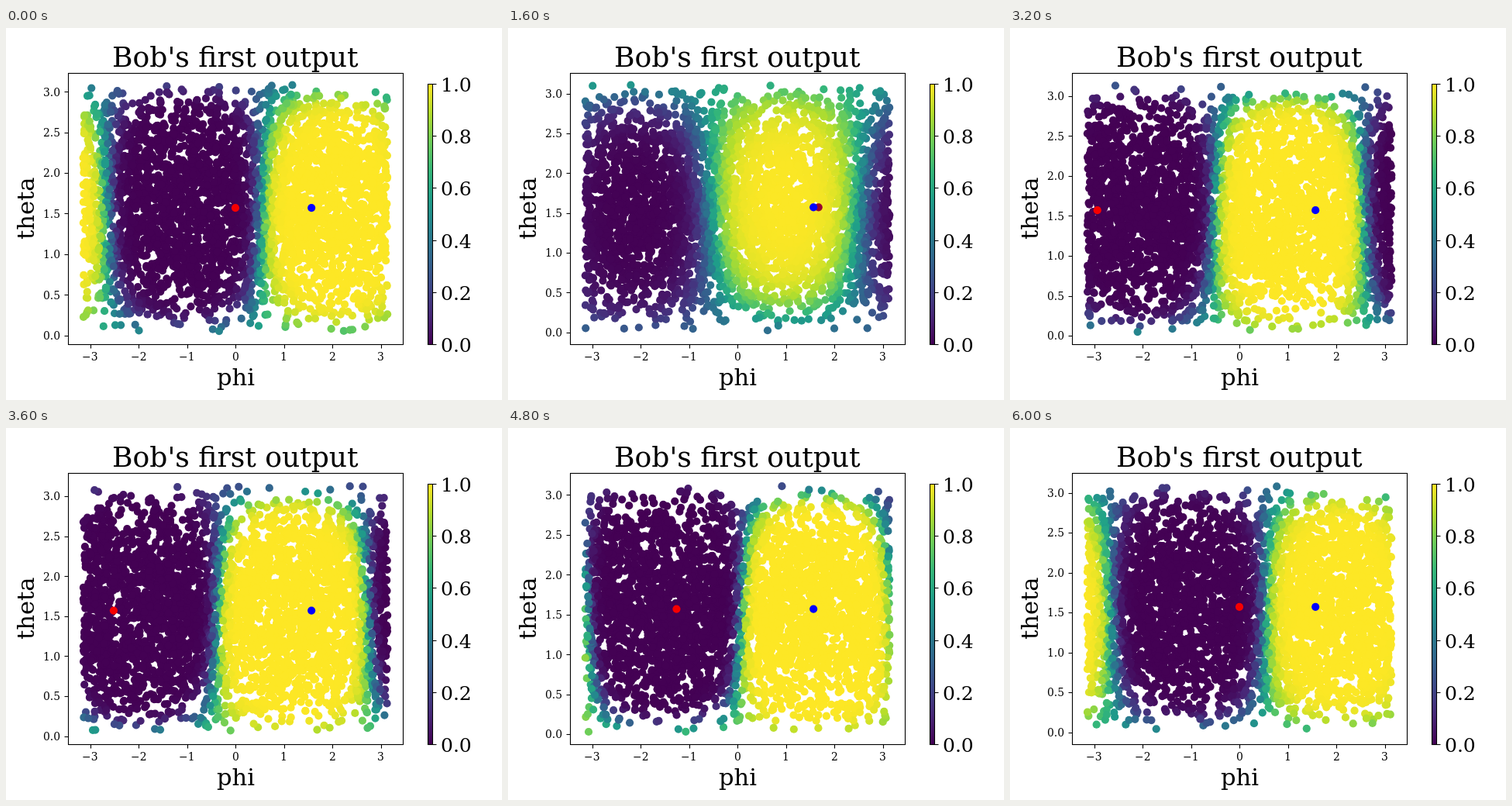
Animation of 640x480 px, one loop 6200 ms. Source, as an HTML page with a canvas:

```html
<!DOCTYPE html>
<html lang="en">
<head>
<meta charset="utf-8">
<title>Bob's first output</title>
<style>
html, body { margin: 0; width: 100%; height: 100%; overflow: hidden; background: #fff; }
canvas { display: block; }
</style>
</head>
<body>
<canvas id="stage" width="640" height="480"></canvas>
<script>
const ctx = document.getElementById('stage').getContext('2d');
const { PI, sin, cos, round, floor } = Math;
const STEP = 200, STEPS = 31, POINTS = 3800, RADIUS = 5.1;
const LEFT = 80.5, RIGHT = 512.5, TOP = 58.5, BOTTOM = 408.5;

const viridis = ['440154', '482878', '3e4989', '31688e', '26828e',
  '1f9e89', '35b779', '6ece58', 'b5de2b', 'fde725']
  .map(h => [0, 2, 4].map(i => parseInt(h.slice(i, i + 2), 16)));

function random(seed) {
  return () => {
    seed = (seed + 0x6d2b79f5) | 0;
    let t = Math.imul(seed ^ (seed >>> 15), 1 | seed);
    t = (t + Math.imul(t ^ (t >>> 7), 61 | t)) ^ t;
    return ((t ^ (t >>> 14)) >>> 0) / 4294967296;
  };
}

function color(p) {
  const v = p * 9, i = Math.min(8, floor(v));
  return `rgb(${viridis[i].map((c, j) => round(c + (viridis[i + 1][j] - c) * (v - i)))})`;
}

const wrap = a => a - 2 * PI * floor((a + PI) / (2 * PI));
const snap = v => round(v) + 0.5;
const px = phi => 296 + 62.5 * phi;

function dot(x, y, fill) {
  ctx.fillStyle = fill;
  ctx.beginPath();
  ctx.arc(x, y, RADIUS, 0, 2 * PI);
  ctx.fill();
}

function line(x1, y1, x2, y2) {
  ctx.beginPath();
  ctx.moveTo(x1, y1);
  ctx.lineTo(x2, y2);
  ctx.stroke();
}

// anchor: 0 left, 0.5 centre, 1 right; text starts on whole pixels
function text(str, x, y, pt, anchor = 0.5) {
  ctx.fillStyle = '#000';
  ctx.font = `${pt * 100 / 72}px "DejaVu Serif", "Noto Serif", serif`;
  ctx.fillText(str, round(x - ctx.measureText(str).width * anchor), floor(y) + 1);
}

function drawColorbar() {
  const ramp = ctx.createLinearGradient(0, 408, 0, 72);
  viridis.forEach((c, i) => ramp.addColorStop(i / 9, `rgb(${c})`));
  ctx.fillStyle = ramp;
  ctx.fillRect(544.5, 72.5, 6, 336);
  ctx.strokeRect(544.5, 72.5, 6, 336);
  for (let i = 0; i <= 5; i++) {
    const y = 408 - 67.2 * i;
    line(550.5, snap(y), 555.5, snap(y));
    text((i / 5).toFixed(1), 560.5, y + 9.4, 18, 0);
  }
}

function drawAxes(py) {
  ctx.strokeRect(LEFT, TOP, RIGHT - LEFT, BOTTOM - TOP);
  for (let v = -3; v <= 3; v++) {
    const x = px(v);
    line(snap(x), BOTTOM, snap(x), BOTTOM + 5);
    text(String(v).replace('-', '\u2212'), x, 428.3, 10);
  }
  for (let v = 0; v <= 3; v += 0.5) {
    const y = py(v);
    line(LEFT - 5, snap(y), LEFT, snap(y));
    text(v.toFixed(1), 70.3, y + 4.8, 10, 1);
  }
  text("Bob's first output", 296, 49.3, 26);
  text('phi', 296, 460.4, 22);
  ctx.save();
  ctx.translate(35, 233);
  ctx.rotate(-PI / 2);
  text('theta', 0, 0, 22);
  ctx.restore();
}

function draw(k) {
  const red = wrap(2 * PI * k / 30), blue = PI / 2;
  const gap = wrap(red + blue); // zero when the two settings are opposite

  const center = 1.52 + 0.36 * gap * (1 - (gap / 3.4) ** 6);
  const steep = 12.5 + 6.5 * cos(gap);
  const pole = 0.5 + cos(gap);
  const bias = -0.2;

  // the theta axis rescales a little with each sample
  const lo = 0.03 - 0.025 * cos(2 * PI * (k - 7.5) / 22);
  const hi = 3.112 - 0.028 * cos(2 * PI * k / 36);
  const py = theta => 392.1 - 318.6 * (theta - lo) / (hi - lo);
  const rnd = random(k * 977 + 5);

  ctx.fillStyle = '#fff';
  ctx.fillRect(0, 0, 640, 480);
  ctx.strokeStyle = '#000';
  ctx.lineWidth = 1.1;

  // points spread evenly over a sphere
  for (let i = 0; i < POINTS; i++) {
    const phi = (rnd() * 2 - 1) * PI;
    const z = cos(hi) + rnd() * (cos(lo) - cos(hi));
    const theta = Math.acos(z);
    const logit = steep * sin(theta) * cos(phi - center) + pole * z + bias;
    dot(px(phi), py(theta), color(1 / (1 + Math.exp(-logit))));
  }

  dot(px(red), py(PI / 2), cos(gap) < -0.5 ? '#960030' : '#f60000');
  dot(px(blue), py(PI / 2), '#00f');

  drawAxes(py);
  drawColorbar();
}

let shown = -1;
const start = performance.now();
function tick() {
  const k = floor((performance.now() - start) / STEP) % STEPS;
  if (k !== shown) draw(shown = k);
  requestAnimationFrame(tick);
}
tick();
</script>
</body>
</html>
```
